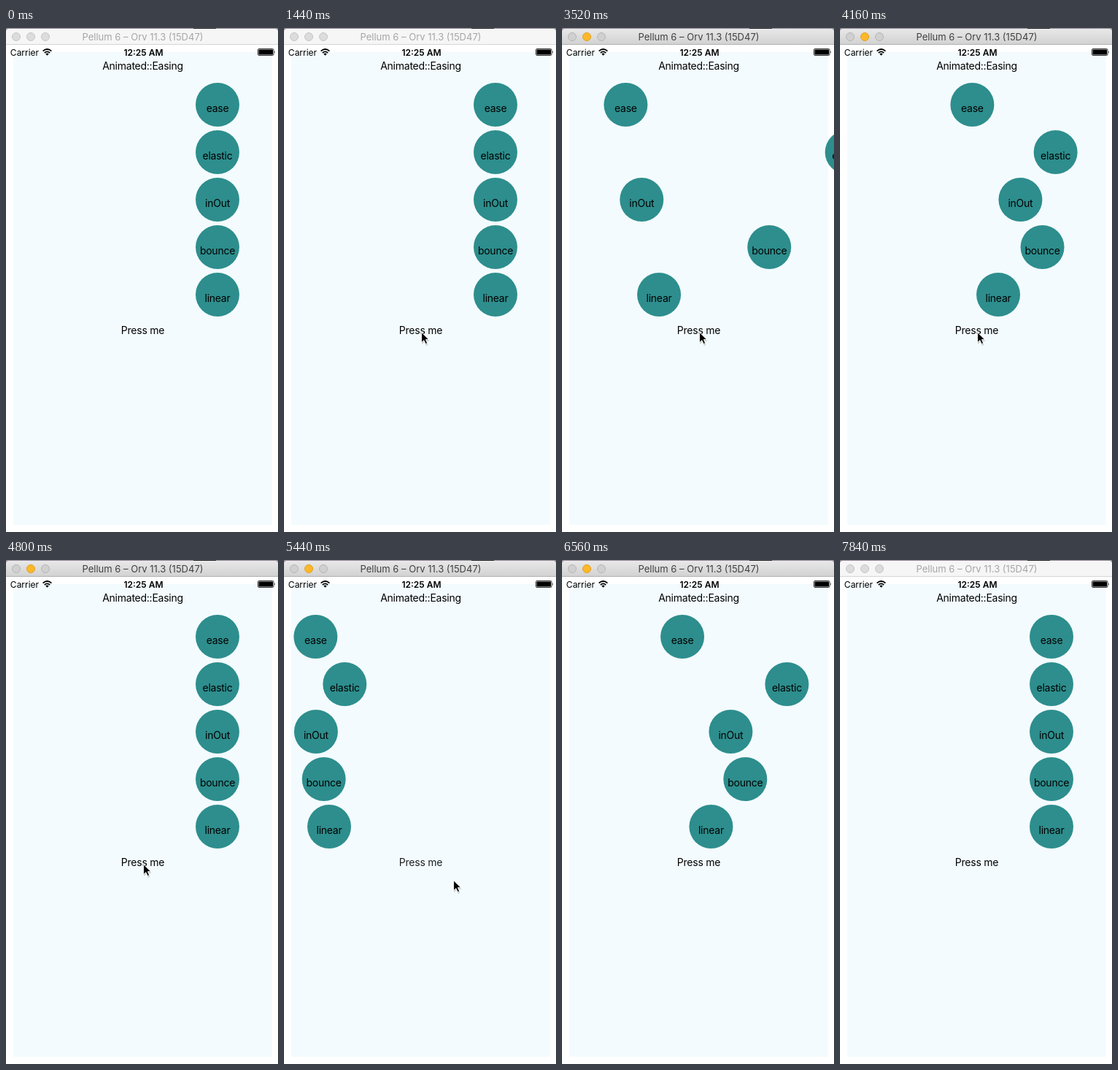
An HTML page that plays this animation: 373x690 px, repeating every 8 s.

```html
<!DOCTYPE html>
<html lang="en">
<head>
<meta charset="utf-8">
<title>Easing demo</title>
<style>
  html, body { margin: 0; width: 100%; height: 100%; overflow: hidden; background: #fff; }
  svg { display: block; width: 373px; height: 690px; }
  text { font-family: Inter, Roboto, sans-serif; font-size: 14px; text-anchor: middle; }
  .app text { letter-spacing: -0.25px; }
  .status text { font-size: 12px; }
  .bar { fill: #f6f6f6; }
  .edge { fill: #d5d5d5; }
  .title { font-size: 13px; fill: #a6a6a6; }
  .light { fill: #dcdcdc; stroke: #c6c6c6; }
  .active .bar { fill: url(#chrome); }
  .active .edge { fill: #b1b1b1; }
  .active .title { fill: #404040; }
  .active .light { fill: #d0d0d0; stroke: #b6b6b6; }
  .active .mid { fill: #fdb827; stroke: #e0a02a; }
  .ball { fill: #2d8e8d; }
</style>
</head>
<body>
<svg viewBox="0 0 373 690">
  <defs>
    <linearGradient id="chrome" x1="0" y1="0" x2="0" y2="1">
      <stop offset="0" stop-color="#e8e8e8"/>
      <stop offset="1" stop-color="#d1d1d1"/>
    </linearGradient>
  </defs>

  <rect width="373" height="690" fill="#fff"/>
  <rect x="10" y="33" width="355" height="647" fill="#f3fbfe"/>

  <g id="win">
    <rect width="373" height="5" fill="#8d8490"/>
    <rect x="257" width="31" height="1" fill="#1c1a1e"/>
    <path class="bar" d="M0 23V5Q0 1 4 1H369Q373 1 373 5V23Z"/>
    <rect class="edge" y="22" width="373" height="1"/>
    <circle class="light" cx="14" cy="12" r="5.5"/>
    <circle class="light mid" cx="34" cy="12" r="5.5"/>
    <circle class="light" cx="54" cy="12" r="5.5"/>
    <text class="title" x="187.5" y="17">Pellum 6 – Orv 11.3 (15D47)</text>
  </g>

  <g class="status">
    <text x="25.5" y="37.5">Carrier</text>
    <text x="188.5" y="37.5" font-weight="600">12:25 AM</text>
    <g fill="none" stroke="#000" stroke-width="1.7">
      <path d="M50.6 31.6Q56.5 26.4 62.4 31.6"/>
      <path d="M52.8 34Q56.5 30.8 60.2 34"/>
    </g>
    <path d="M54.3 35.4Q56.5 33.6 58.7 35.4L56.5 37.8Z"/>
    <rect x="345.5" y="28.5" width="21.5" height="9" rx="1.5" fill="none" stroke="#000" stroke-width="0.8"/>
    <rect x="346.5" y="29.5" width="19.5" height="7" rx="0.6"/>
    <path d="M368 31.2Q369.6 33 368 34.8Z"/>
  </g>

  <g class="app">
    <text x="187.5" y="56.5">Animated::Easing</text>
    <g id="balls"></g>
    <text id="press" x="187.5" y="418.5">Press me</text>
  </g>

  <g id="cursor">
    <path d="M1 1.5V17L4.4 13.8L6.8 19L9.4 17.8L7.2 12.8H11.6Z" fill="#000" opacity="0.18"/>
    <path d="M0.6 0.8V14.6L3.9 11.6L6.2 16.6L8.6 15.5L6.4 10.6H10.7Z" fill="#000" stroke="#fff" stroke-width="0.9"/>
  </g>
</svg>

<script>
const LOOP = 8000, STEP = 160;
const RUNS = [{ start: 2811, span: 1905 }, { start: 5267, span: 1966 }];

const $ = id => document.getElementById(id);
const clamp = v => Math.min(1, Math.max(0, v));
const quad = p => p < 0.5 ? 2 * p * p : 1 - 2 * (1 - p) ** 2;

// cubic-bezier(.42, 0, 1, 1), solved for x by bisection
function easeIn(x) {
  let lo = 0, hi = 1;
  for (let i = 0; i < 24; i++) {
    const s = (lo + hi) / 2;
    const bx = 1.26 * s * (1 - s) ** 2 + 3 * s * s * (1 - s) + s ** 3;
    if (bx < x) lo = s; else hi = s;
  }
  return 3 * lo * lo * (1 - lo) + lo ** 3;
}

function bounce(p) {
  const k = 7.5625, d = 2.75;
  if (p < 1 / d) return k * p * p;
  if (p < 2 / d) return k * (p - 1.5 / d) ** 2 + 0.75;
  if (p < 2.5 / d) return k * (p - 2.25 / d) ** 2 + 0.9375;
  return k * (p - 2.625 / d) ** 2 + 0.984375;
}

const elastic = p => 1 - Math.cos(p * Math.PI / 2) ** 3 * Math.cos(p * 2 * Math.PI);

const EASINGS = { ease: easeIn, elastic, inOut: quad, bounce, linear: p => p };

const balls = Object.entries(EASINGS).map(([name, fn], i) => {
  const g = document.createElementNS('http://www.w3.org/2000/svg', 'g');
  g.innerHTML = `<circle class="ball" r="30"/><text y="10">${name}</text>`;
  $('balls').append(g);
  return { g, fn, y: 105 + 65 * i };
});

// time, x, y of the pointer tip
const ENTER = [[160, 226, 640], [320, 227, 602], [480, 226, 540], [640, 222, 472],
  [800, 222, 417], [960, 226, 398], [1120, 228, 407], [1280, 204, 412], [1440, 188, 416]];
const LEAVE = [[5280, 188, 416], [5440, 232, 438], [5600, 312, 456], [5760, 380, 462]];
const PATH = [...ENTER, ...LEAVE];

function pointer(t) {
  if (t < PATH[0][0] || t >= PATH[PATH.length - 1][0]) return null;
  const i = PATH.findIndex(k => k[0] > t);
  const [t0, x0, y0] = PATH[i - 1], [t1, x1, y1] = PATH[i];
  const p = (t - t0) / (t1 - t0);
  return [x0 + (x1 - x0) * p, y0 + (y1 - y0) * p];
}

function labelOpacity(t) {
  const run = RUNS.findLast(r => t >= r.start);
  if (run) return 0.2 + 0.8 * quad(clamp((t - run.start) / 240));
  return 1 - 0.8 * quad(clamp((t - 2490) / 150));
}

function render(t) {
  const run = RUNS.findLast(r => t >= r.start);
  const p = run ? clamp((t - run.start) / run.span) : 1;
  for (const b of balls) {
    b.g.setAttribute('transform', `translate(${40 + 250 * b.fn(p)} ${b.y})`);
  }
  $('win').setAttribute('class', t >= 2400 && t < 7840 ? 'active' : '');
  $('press').setAttribute('opacity', labelOpacity(t));
  const tip = pointer(t);
  $('cursor').setAttribute('visibility', tip ? 'visible' : 'hidden');
  if (tip) $('cursor').setAttribute('transform', `translate(${tip})`);
}

const origin = performance.now();
function tick() {
  const t = (performance.now() - origin) % LOOP;
  render(Math.floor(t / STEP) * STEP);
  requestAnimationFrame(tick);
}
tick();
</script>
</body>
</html>
```
